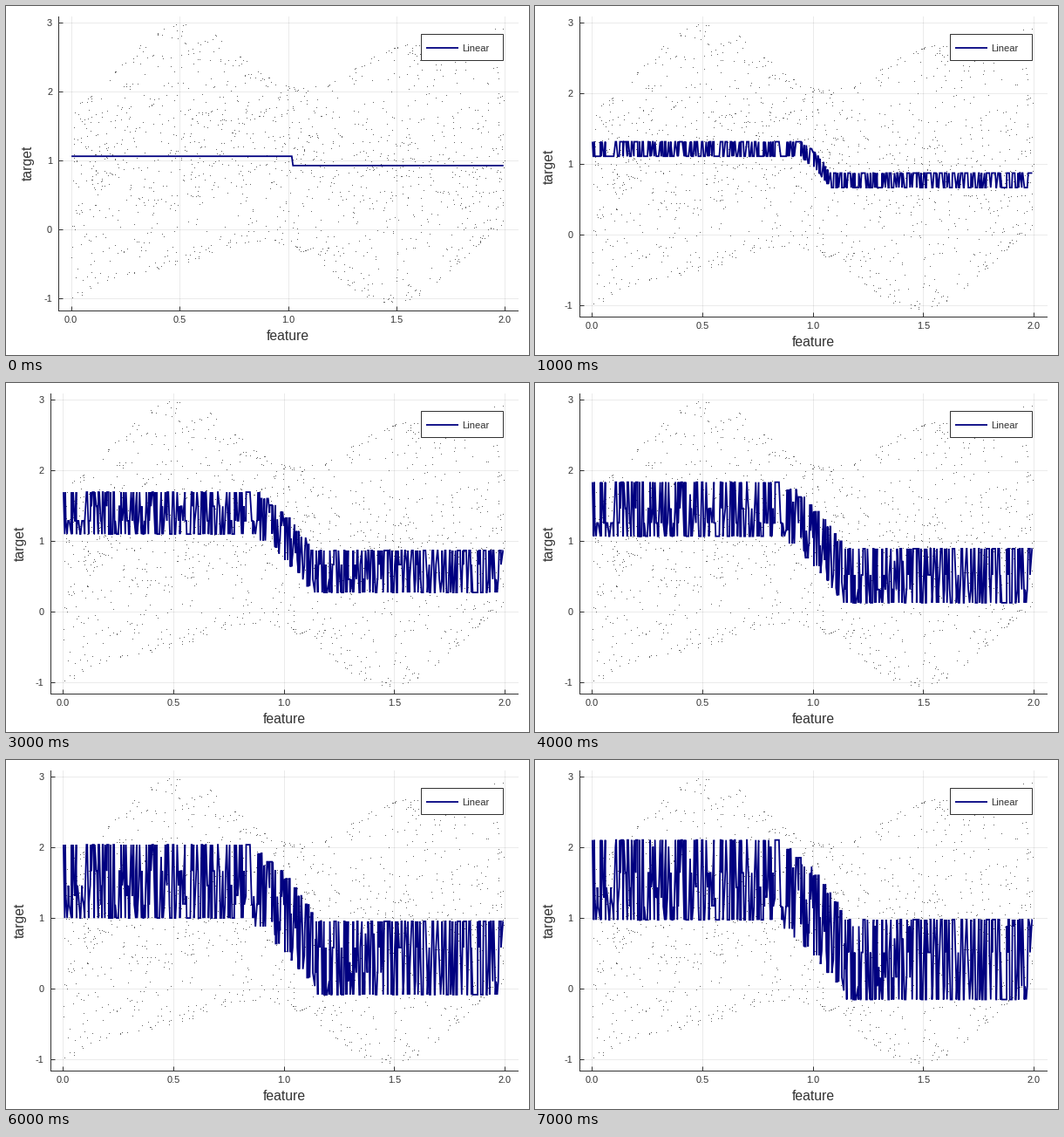
A matplotlib script for the animation above (8 s loop, 600 by 400 pixels).

```python
import matplotlib.pyplot as plt
import numpy as np
from matplotlib.animation import FuncAnimation
from matplotlib.patches import Rectangle
from matplotlib.transforms import Affine2D

W, H, DPI = 600, 400, 100
PX = 72 / DPI  # points per pixel
RIGHT, TOP = 587.5, 11.5
NAVY, INK = "#000080", "#333333"
plt.rcParams["font.family"] = "Liberation Sans"

fig = plt.figure(figsize=(W / DPI, H / DPI), dpi=DPI, facecolor="white")
ax = fig.add_axes([0, 0, 1, 1])
pixels = Affine2D().scale(1 / W, -1 / H).translate(0, 1) + fig.transFigure


def make_points(n=1450):
    """Scattered observations between two wavy bounds, denser on a ridge."""
    rng = np.random.default_rng(12)
    x = rng.uniform(0, 2, n)
    wave, ripple = np.sin(np.pi * x), np.cos(2 * np.pi * x)
    top = 2.08 + .315 * x**2 + .48 * wave - .33 * ripple
    low = -1.32 + 1.1 * x - .265 * x**2 + .56 * wave + .24 * ripple
    ridge = 1 + .32 * np.sin(np.pi * (x - .25))
    swing = np.sin(rng.uniform(0, 2 * np.pi, n))
    spread = (top + low + (top - low) * swing) / 2
    near = np.clip(ridge + rng.normal(0, .5, n), low, top)
    return x, np.where(rng.random(n) < .62, spread, near)


def make_rows(n=520):
    """Rows given to the model; z is a second, unseen feature."""
    rng = np.random.default_rng(5)
    x = (np.arange(n) + rng.uniform(-.8, .8, n)) * 1.994 / (n - 1)
    x = np.sort(np.clip(x, 0, 1.994))
    z = rng.random(n)
    z[0] = z[-1] = 1
    return x, z


def swing(stage):
    return .61 * np.sin(.17 * stage)


def predict(stage, x, z):
    centre = .97 + .025 * .7**stage
    half_drop = .62 - .5525 * .72**stage

    # The fall starts as one step and widens into a staircase
    reach = .36 * (1 - .6**stage)
    steps = (np.arange(9) + .5) / 9
    cuts = 1.02 + reach * (steps**(2 / 3) - .6)
    fallen = np.mean(x[:, None] > cuts, axis=1)
    y = centre + half_drop * (1 - 2 * fallen)

    # Each stage adds one split on z
    for j in range(stage):
        split = .5 + .18 * np.sin(2.4 * j)
        y += (swing(j + 1) - swing(j)) * np.sign(z - split)
    return y


# Axes
ax.set_xlim(-.059, 2.061)
ax.set_ylim(-1.167, 3.095)
ax.set_xticks(np.arange(0, 2.1, .5))
ax.set_yticks(range(-1, 4))
ax.xaxis.set_major_formatter(lambda v, _: f"{v:.1f}")
ax.yaxis.set_major_formatter(lambda v, _: f"{v:.0f}")
ax.set_axisbelow(True)
ax.grid(color="black", alpha=.08, lw=PX)
ax.spines[["top", "right"]].set_visible(False)
for side in ("left", "bottom"):
    ax.spines[side].set(linewidth=PX, color=INK)
ax.tick_params(direction="in", length=5 * PX, width=PX, color=INK,
               labelsize=11 * PX, labelcolor=INK)
ax.tick_params(axis="x", pad=6.5 * PX)
ax.tick_params(axis="y", pad=7 * PX)


def label(x, y, text, size, **kw):
    return fig.text(x, y, text, transform=pixels, fontsize=size * PX,
                    color=INK, **kw)


middle = dict(ha="center", va="center")
x_name = label(0, 0, "feature", 15.8, **middle)
y_name = label(0, 0, "target", 15.8, rotation=90, **middle)

# Data
ax.plot(*make_points(), ls="none", marker=",", color="#666666", zorder=2)
row_x, row_z = make_rows()
line = dict(color=NAVY, lw=1.8 * PX, solid_capstyle="butt")
curve, = ax.plot([], [], zorder=3, solid_joinstyle="miter", **line)

# Legend
fig.add_artist(Rectangle((476, 32), 94, 30, transform=pixels,
                         fc="white", ec=INK, lw=PX))
fig.add_artist(plt.Line2D([482, 519], [47.5, 47.5], transform=pixels, **line))
label(523, 52, "Linear", 11.2, ha="left", va="baseline")


def place_axes(left, bottom):
    ax.set_position([left / W, 1 - bottom / H,
                     (RIGHT - left) / W, (bottom - TOP) / H])
    x_name.set_position(((left + RIGHT) / 2, bottom + 30))
    y_name.set_position((left - 34.5, (TOP + bottom) / 2))


def draw(stage):
    if stage == 0:
        place_axes(60, 348.5)
    else:
        place_axes(50.5, 356)
    curve.set_data(row_x, predict(stage, row_x, row_z))
    return curve, x_name, y_name


anim = FuncAnimation(fig, draw, frames=8, interval=1000, repeat=True,
                     repeat_delay=0, blit=False)
plt.show()
```
